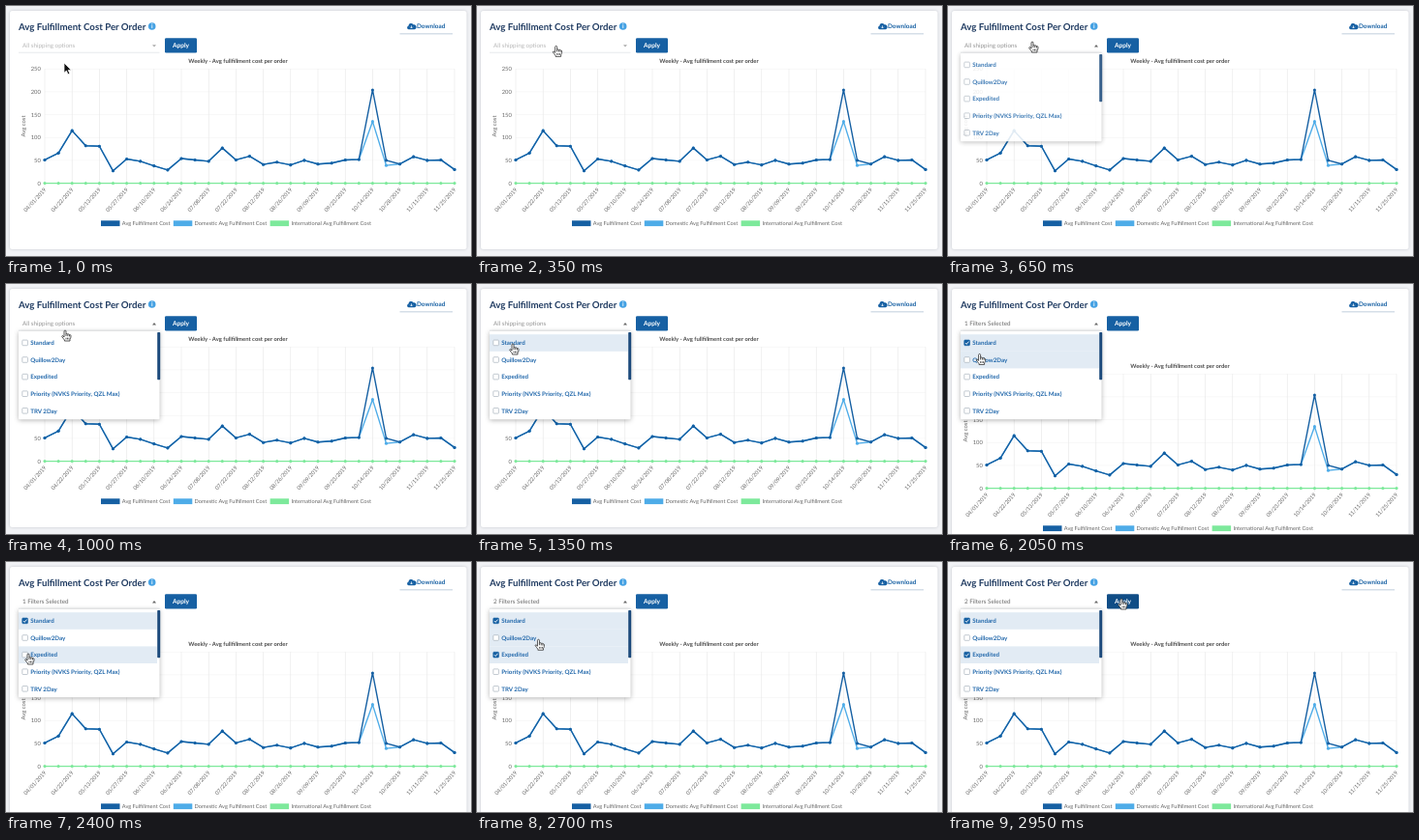
Recreate the animation shown at these times as an HTML page. Size 480 by 259 pixels, loop 3 s.

```html
<!DOCTYPE html>
<html lang="en">
<head>
<meta charset="utf-8">
<title>Avg Fulfillment Cost Per Order</title>
<style>
html, body { margin: 0; width: 100%; height: 100%; overflow: hidden; background: #f1f2f5; }
svg { display: block; width: 100vw; height: 100vh; }
text { font-family: Lato, "Open Sans", sans-serif; text-rendering: geometricPrecision; white-space: pre; }
#card { filter: drop-shadow(0 .5px 1.5px rgba(40, 50, 70, .22)); }
#sheet { filter: drop-shadow(0 1.5px 2.5px rgba(0, 0, 0, .3)); }
</style>
</head>
<body>
<svg id="stage" viewBox="0 0 480 259"></svg>
<script>
(() => {
const LOOP = 3000, STEP = 50;
const OPEN = 580, CLICK1 = 1550, CLICK2 = 2550;
const NAVY = '#213c62', BLUE = '#1660a3', SKY = '#4eace8', GREEN = '#7de99b';

const stage = document.getElementById('stage');

function set(el, attrs) {
  for (const key in attrs) el.setAttribute(key, attrs[key]);
}
function add(parent, tag, attrs = {}, content) {
  const el = document.createElementNS('http://www.w3.org/2000/svg', tag);
  set(el, attrs);
  if (content !== undefined) el.textContent = content;
  parent.append(el);
  return el;
}
const group = parent => add(parent, 'g');
const rect = (parent, x, y, width, height, fill, more) =>
  add(parent, 'rect', { x, y, width, height, fill, ...more });
const path = (parent, d, more) => add(parent, 'path', { d, ...more });
const label = (parent, str, x, y, size, fill, more) =>
  add(parent, 'text', { x, y, 'font-size': size, fill, ...more }, str);
const bold = { 'font-weight': 700 };
const centered = { 'text-anchor': 'middle' };

// Page header
const card = rect(stage, 4, 5, 471.5, 247, '#fff', { id: 'card', rx: 2.5 });
label(stage, 'Avg Fulfillment Cost Per Order', 13, 24.7, 9.7, NAVY, bold);
add(stage, 'circle', { cx: 150.7, cy: 21, r: 3.8, fill: '#45a1e3' });
label(stage, 'i', 150.7, 23.3, 6.4, '#fff', { ...bold, ...centered });

path(stage, 'M415.6 24.2a1.9 1.9 0 0 1-.1-3.7a2.6 2.6 0 0 1 4.9-1.2a1.9 1.9 0 0 1 1.3 4.9z', { fill: BLUE });
path(stage, 'M418.5 20.4v2.4M417.2 21.7l1.3 1.3l1.3-1.3', { fill: 'none', stroke: '#fff', 'stroke-width': .7 });
label(stage, 'Download', 424, 23.4, 6.4, BLUE, bold);
rect(stage, 406.5, 28.4, 54.5, .9, '#b9c9da');

// Chart
const chart = group(stage);
const left = 40, gap = 14.1, zero = 183.6, top = 65.2;
const px = i => left + i * gap;
const py = value => zero - value * (zero - top) / 250;

label(chart, 'Weekly - Avg fullfillment cost per order', 239.5, 59, 5.9, '#4c4c4c', { ...bold, ...centered });
label(chart, 'Avg cost', 0, 0, 5.9, '#666', { ...centered, transform: 'translate(20.2 124.5) rotate(-90)' });
for (let v = 0; v <= 250; v += 50) {
  rect(chart, left, py(v) - .3, 423, .6, '#f3f3f3');
  label(chart, v, 35.8, py(v) + 2, 5.8, '#666', { 'text-anchor': 'end' });
}
const dates = '04/01 04/22 05/13 05/27 06/10 06/24 07/08 07/22 08/12 08/26 09/09 09/23 10/14 10/28 11/11 11/25';
dates.split(' ').forEach((date, i) => {
  const x = px(i * 2);
  rect(chart, x - .3, top, .6, 122, '#e6e6e6');
  label(chart, date + '/2019', 0, 0, 5.65, '#666', {
    'text-anchor': 'end', transform: `translate(${x + 1.8} 190.6) rotate(-48)`
  });
});

const total = [51, 66, 115, 82, 81, 27, 53, 48, 38, 29, 54, 51, 48, 77, 51, 59,
  41, 46, 40, 50, 42, 44, 51, 52, 204, 50, 42, 58, 50, 51, 30];
const domestic = total.map((v, i) => i === 24 ? 135 : i === 25 ? 39 : v);

function series(values, color) {
  const points = values.map((v, i) => [px(i), py(v)]);
  add(chart, 'polyline', {
    points: points.join(' '), fill: 'none', stroke: color, 'stroke-width': 1.4, 'stroke-linejoin': 'round'
  });
  for (const [cx, cy] of points) add(chart, 'circle', { cx, cy, r: 1.55, fill: color });
}
series(total.map(() => 0), GREEN);
series(domestic, SKY);
series(total, BLUE);

[[98, BLUE, 'Avg'], [172.8, SKY, 'Domestic Avg'], [272.6, GREEN, 'International Avg']].forEach(([x, color, name]) => {
  rect(chart, x, 222.3, 19.5, 5.8, color);
  label(chart, name + ' Fulfillment Cost', x + 21.8, 227.1, 5.65, '#666');
});

// Filter bar
const field = label(stage, '', 17, 43.2, 6.3, '#b5b5b5');
rect(stage, 13, 47.8, 145.5, .7, '#dcdfe3');
const caret = path(stage, '');
const button = rect(stage, 164, 33.3, 33, 15.2, BLUE, { rx: 1.3 });
label(stage, 'Apply', 180.5, 43.1, 6.6, '#fff', { ...bold, ...centered });

// Option list
const menu = group(stage);
rect(menu, 13, 48.8, 145.5, 91.4, '#fff', { id: 'sheet', rx: 1 });
const options = ['Standard', 'Quillow2Day', 'Expedited', 'Priority (NVKS Priority, QZL Max)', 'TRV 2Day'];
const rows = options.map((name, i) => {
  const y = 61 + i * 17.6;
  const back = rect(menu, 13, y - 8.8, 143, 17.6, '#e2ebf4');
  const box = rect(menu, 16.8, y - 2.9, 5.6, 5.6, '#fff', { rx: .7, 'stroke-width': .7 });
  const mark = path(menu, `M17.9 ${y}l1.3 1.4l2.2-2.8`, { fill: 'none', stroke: '#fff', 'stroke-width': .9 });
  label(menu, name, 25.2, y + 2.2, 6.2, '#2268ab', bold);
  return { y, back, box, mark };
});
rect(menu, 156.2, 50, 3, 49.3, '#1c4a7c', { rx: .8 });

// Pointers, each with its tip at the origin
const arrow = path(stage, 'M0 0V10.2L2.4 8L4 11.8L5.8 11L4.2 7.4H7.3Z',
  { fill: '#111', stroke: '#fff', 'stroke-width': .7 });
const hand = path(stage,
  'M-1 1C-1-.3 1-.3 1 1V4.1C1.3 3.2 2.7 3.3 2.8 4.3C3.2 3.6 4.4 3.8 4.5 4.8C4.9 4.3 6 4.6 6 5.6' +
  'C6 8 5.5 8.6 5 9.4V11H-.6V10C-1.4 8.8-2.6 7.6-3.2 6.5C-3.6 5.6-2.4 5.2-1.8 6L-1 7Z' +
  'M1 4.1V6M2.8 4.3V6.2M4.5 4.8V6.4M1 7.7V9.4M2.5 7.7V9.4M4 7.7V9.4',
  { fill: '#fff', stroke: '#222', 'stroke-width': .75, 'stroke-linejoin': 'round' });

// time, x, y of the pointer tip
const route = [
  [0, 60, 59], [100, 60, 59], [450, 87, 37], [700, 87, 37], [1000, 61, 48], [1300, 37, 62],
  [1900, 37, 62], [2300, 23, 95], [2600, 23, 95], [2900, 179, 38], [LOOP, 179, 38]
];
function pointer(t) {
  const i = route.findIndex(stop => stop[0] > t);
  const [t0, x0, y0] = route[i - 1], [t1, x1, y1] = route[i];
  const u = (t - t0) / (t1 - t0), k = u * u * (3 - 2 * u);
  return [x0 + (x1 - x0) * k, y0 + (y1 - y0) * k];
}

function draw(t) {
  const [x, y] = pointer(t);
  const opened = t >= OPEN;
  const fade = Math.min(1, Math.max(0, (t - OPEN) / 140));
  const picked = (t >= CLICK1) + (t >= CLICK2);

  card.setAttribute('height', picked ? 275 : 247);
  chart.setAttribute('transform', `translate(0 ${picked ? 28 : 0})`);
  field.textContent = picked ? picked + ' Filters Selected' : 'All shipping options';
  field.setAttribute('fill', picked ? '#666' : opened ? '#959595' : '#b8b8b8');
  set(caret, opened
    ? { d: 'M151 42.5h4l-2-2.4z', fill: '#666' }
    : { d: 'M151 40.2h4l-2 2.4z', fill: '#aaa' });

  menu.setAttribute('opacity', 1 - (1 - fade) ** 3);
  rows.forEach((row, i) => {
    const checked = i === 0 && picked > 0 || i === 2 && picked > 1;
    const hover = opened && x > 13 && x < 156 && Math.abs(y - row.y) < 8.8;
    row.back.setAttribute('opacity', checked || hover ? 1 : 0);
    set(row.box, { fill: checked ? BLUE : '#fff', stroke: checked ? BLUE : '#a9b3be' });
    row.mark.setAttribute('opacity', checked ? 1 : 0);
  });

  const onButton = x > 164 && x < 197 && y > 33 && y < 48.5;
  button.setAttribute('fill', onButton ? '#104d86' : BLUE);

  const pointing = opened || y < 48;
  arrow.setAttribute('opacity', pointing ? 0 : 1);
  hand.setAttribute('opacity', pointing ? 1 : 0);
  for (const shape of [arrow, hand]) shape.setAttribute('transform', `translate(${x} ${y})`);
}

function frame() {
  draw(Math.floor(performance.now() % LOOP / STEP) * STEP);
  requestAnimationFrame(frame);
}
frame();
})();
</script>
</body>
</html>
```
